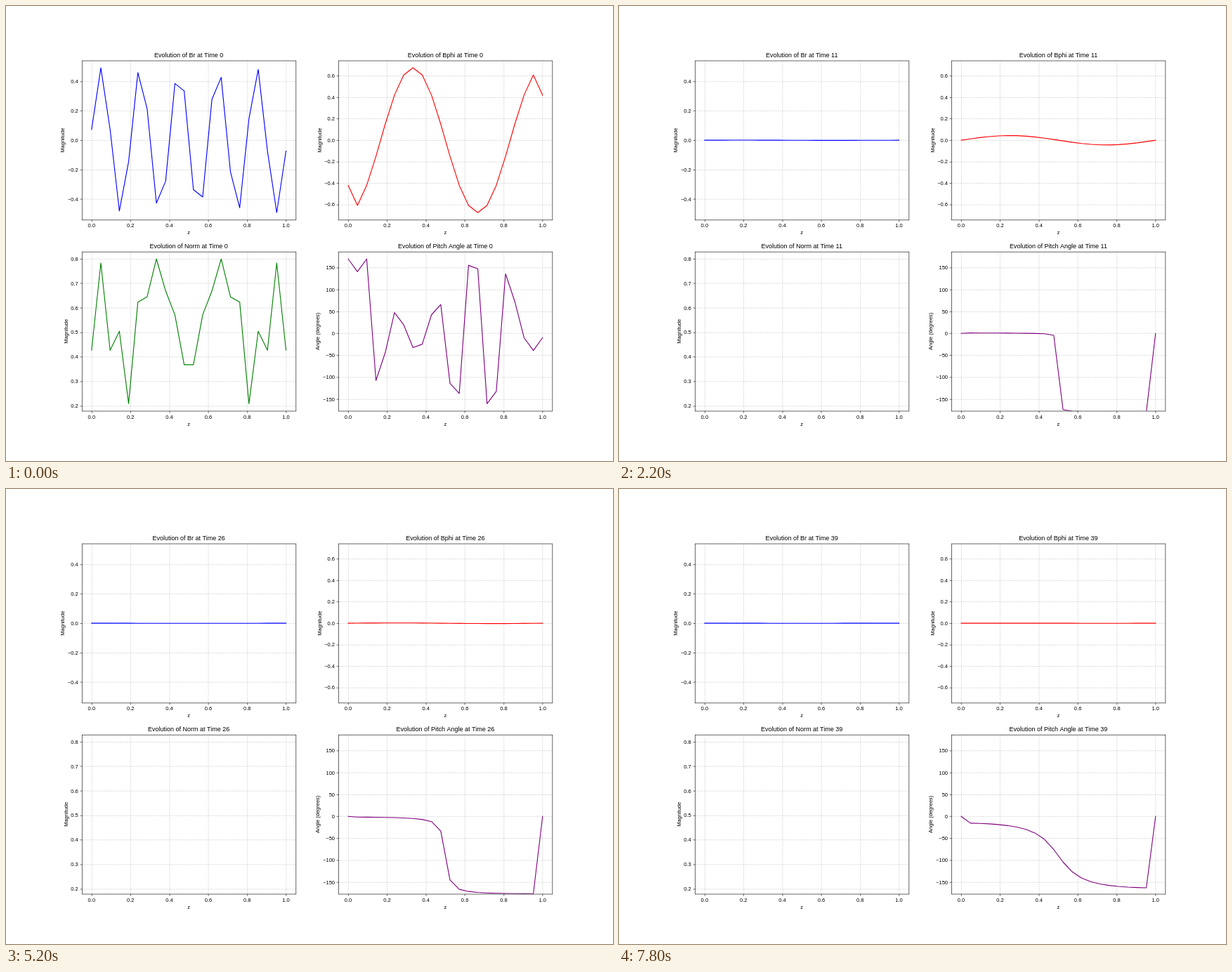
Animation, 864 px wide and 648 px high, one loop 8 s. Source, as an HTML page with a canvas:

```html
<!DOCTYPE html>
<html lang="en">
<head>
<meta charset="utf-8">
<title>Field evolution</title>
<style>
  html, body { margin: 0; width: 100%; height: 100%; overflow: hidden; background: #fff; }
  canvas { display: block; }
</style>
</head>
<body>
<canvas id="stage" width="864" height="648"></canvas>
<script>
const ctx = document.getElementById('stage').getContext('2d');

// Crank-Nicolson diffusion of two coupled fields on 22 grid points.
const LAST = 21, STEPS = 40, STEP_MS = 200;
const DIFFUSION = 2.03, COUPLING = 0.00186;

function initialField(formula) {
  const field = Array.from({ length: LAST + 1 }, (_, i) => formula(i / LAST));
  field[0] = field[2];
  field[LAST] = field[LAST - 2];
  return field;
}

function diffuse(u, source) {
  const half = DIFFUSION / 2, diagonal = 1 + DIFFUSION;
  const c = [0], d = [0], next = Array(LAST + 1).fill(0);
  for (let i = 1; i < LAST; i++) {
    const rhs = (1 - DIFFUSION) * u[i] + half * (u[i - 1] + u[i + 1]) + source(i);
    const pivot = diagonal - half * c[i - 1];
    c[i] = half / pivot;
    d[i] = (rhs + half * d[i - 1]) / pivot;
  }
  for (let i = LAST - 1; i > 0; i--) next[i] = d[i] + c[i] * next[i + 1];
  return next;
}

function simulate() {
  let br = initialField(z => 0.494 * Math.sin(10 * Math.PI * z));
  let bphi = initialField(z => -0.675 * Math.cos(3 * Math.PI * z));
  const states = [];
  for (let t = 0; t < STEPS; t++) {
    states.push([
      br, bphi,
      br.map((b, i) => Math.hypot(b, bphi[i])),
      br.map((b, i) => Math.atan2(b, bphi[i]) * 180 / Math.PI)
    ]);
    const old = bphi;
    br = diffuse(br, i => COUPLING * (old[i + 1] - old[i - 1]));
    bphi = diffuse(bphi, () => 0);
  }
  return states;
}

const states = simulate();

// Layout
const WIDTH = 304.364, HEIGHT = 226.8;
const LEFT = [108, 473.236], TOP = [77.76, 349.92];
const TICK = 2.625, PAD = 5.25;
const X_TICKS = [0, 0.2, 0.4, 0.6, 0.8, 1];
const SMALL = '7.5px "Liberation Sans", Arial, sans-serif';
const LARGE = '9px "Liberation Sans", Arial, sans-serif';

const panels = [
  { name: 'Br', color: '#0000ff', label: 'Magnitude', digits: 1, ticks: [-0.4, -0.2, 0, 0.2, 0.4] },
  { name: 'Bphi', color: '#ff0000', label: 'Magnitude', digits: 1, ticks: [-0.6, -0.4, -0.2, 0, 0.2, 0.4, 0.6] },
  { name: 'Norm', color: '#008000', label: 'Magnitude', digits: 1, ticks: [0.2, 0.3, 0.4, 0.5, 0.6, 0.7, 0.8] },
  { name: 'Pitch Angle', color: '#800080', label: 'Angle (degrees)', digits: 0, ticks: [-150, -100, -50, 0, 50, 100, 150] }
];

panels.forEach((p, k) => {
  p.left = LEFT[k % 2];
  p.top = TOP[k >> 1];
  p.right = p.left + WIDTH;
  p.bottom = p.top + HEIGHT;
  const low = Math.min(...states[0][k]), high = Math.max(...states[0][k]);
  const scale = HEIGHT / (1.1 * (high - low));
  p.x = z => p.left + WIDTH * (z + 0.05) / 1.1;
  p.y = v => p.top + HEIGHT / 2 - (v - (low + high) / 2) * scale;
});

// Hairlines sit on the half pixels of a finer raster.
const snap = v => (Math.floor(v / 0.54 + 0.5) + 0.5) * 0.54;

function line(x1, y1, x2, y2) {
  ctx.beginPath();
  ctx.moveTo(x1, y1);
  ctx.lineTo(x2, y2);
  ctx.stroke();
}

function write(text, x, y, font, align) {
  ctx.font = font;
  ctx.textAlign = align;
  ctx.fillText(text, x, y);
}

function drawGrid(p) {
  ctx.strokeStyle = 'rgba(176, 176, 176, 0.7)';
  ctx.lineWidth = 0.6;
  ctx.setLineDash([2.22, 0.96]);
  for (const z of X_TICKS) line(snap(p.x(z)), p.bottom, snap(p.x(z)), p.top);
  for (const v of p.ticks) line(p.left, snap(p.y(v)), p.right, snap(p.y(v)));
  ctx.setLineDash([]);
}

function drawCurve(p, values) {
  ctx.save();
  ctx.beginPath();
  ctx.rect(p.left, p.top, WIDTH, HEIGHT);
  ctx.clip();
  ctx.beginPath();
  values.forEach((v, i) => ctx.lineTo(p.x(i / LAST), p.y(v)));
  ctx.strokeStyle = p.color;
  ctx.lineWidth = 1.125;
  ctx.lineJoin = 'round';
  ctx.lineCap = 'square';
  ctx.stroke();
  ctx.restore();
}

function drawAxes(p, time) {
  const left = snap(p.left), right = snap(p.right), top = snap(p.top), bottom = snap(p.bottom);
  const middle = p.left + WIDTH / 2;
  ctx.strokeStyle = ctx.fillStyle = '#000';
  ctx.lineWidth = 0.6;
  ctx.strokeRect(left, top, right - left, bottom - top);

  for (const z of X_TICKS) {
    const x = p.x(z);
    line(snap(x), bottom, snap(x), bottom + TICK);
    write(z.toFixed(1), x, p.bottom + 10.9, SMALL, 'center');
  }
  let labelWidth = 0;
  for (const v of p.ticks) {
    const y = p.y(v), text = v.toFixed(p.digits).replace('-', '\u2212');
    line(left - TICK, snap(y), left, snap(y));
    write(text, p.left - PAD, y + 2.7, SMALL, 'right');
    labelWidth = Math.max(labelWidth, ctx.measureText(text).width);
  }

  write('z', middle, p.bottom + 20.9, SMALL, 'center');
  write(`Evolution of ${p.name} at Time ${time}`, middle, p.top - 4.5, LARGE, 'center');
  ctx.save();
  ctx.translate(p.left - PAD - labelWidth - 4.6, p.top + HEIGHT / 2);
  ctx.rotate(-Math.PI / 2);
  write(p.label, 0, 0, SMALL, 'center');
  ctx.restore();
}

function frame() {
  const time = Math.floor(performance.now() / STEP_MS) % STEPS;
  ctx.fillStyle = '#fff';
  ctx.fillRect(0, 0, 864, 648);
  panels.forEach((p, k) => {
    drawGrid(p);
    drawCurve(p, states[time][k]);
    drawAxes(p, time);
  });
  requestAnimationFrame(frame);
}
frame();
</script>
</body>
</html>
```
